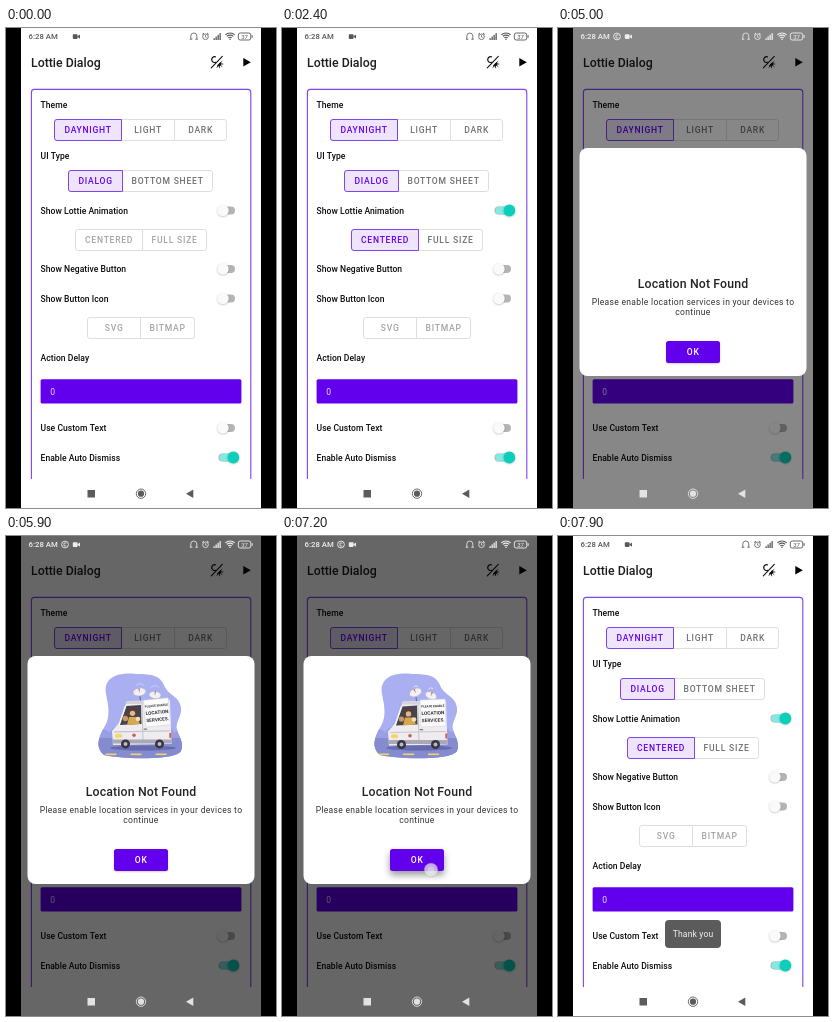
Recreate the animation shown at these times as an HTML page with a canvas. Size 270x480 px, loop 8000 ms.

```html
<!DOCTYPE html>
<html lang="en">
<head>
<meta charset="utf-8">
<title>Lottie Dialog</title>
<style>
html, body { margin: 0; width: 100%; height: 100%; overflow: hidden; background: #000; }
canvas { display: block; width: 270px; height: 480px; }
</style>
</head>
<body>
<canvas id="stage"></canvas>
<script>
const W = 270, H = 480, LOOP = 8000;
const PURPLE = '#6200ee', EDGE = '#7f45ee', RULE = '#dedede', TEAL = '#0cceba', INK = '#1c1c1c';
const canvas = document.getElementById('stage');
const ctx = canvas.getContext('2d');
const ratio = window.devicePixelRatio || 1;
canvas.width = W * ratio;
canvas.height = H * ratio;

const clamp = v => Math.max(0, Math.min(1, v));
const ease = v => v * v * (3 - 2 * v);
const ramp = (t, from, to) => ease(clamp((t - from) / (to - from)));
const mix = (a, b, k) => a + (b - a) * k;
const gray = v => `rgb(${Math.round(v)},${Math.round(v)},${Math.round(v)})`;

function text(str, x, y, o = {}) {
  ctx.font = `${o.weight || 400} ${o.size || 8.55}px Roboto, sans-serif`;
  ctx.letterSpacing = (o.spacing ?? 0.3) + 'px';
  ctx.textAlign = o.align || 'left';
  ctx.textBaseline = 'alphabetic';
  ctx.fillStyle = o.color || INK;
  ctx.fillText(str, x, y);
}

function paint(fill, stroke, width) {
  if (fill) { ctx.fillStyle = fill; ctx.fill(); }
  if (stroke) { ctx.strokeStyle = stroke; ctx.lineWidth = width; ctx.stroke(); }
}

function box(x, y, w, h, r, fill, stroke, width = 1) {
  ctx.beginPath();
  ctx.roundRect(x, y, w, h, r);
  paint(fill, stroke, width);
}

function disc(x, y, r, fill, stroke, width = 1) {
  ctx.beginPath();
  ctx.arc(x, y, r, 0, Math.PI * 2);
  paint(fill, stroke, width);
}

function poly(points, fill) {
  ctx.beginPath();
  points.forEach(([x, y]) => ctx.lineTo(x, y));
  ctx.closePath();
  paint(fill);
}

function line(points, color, width) {
  ctx.beginPath();
  points.forEach(([x, y]) => ctx.lineTo(x, y));
  paint(null, color, width);
}

function layer(alpha, draw) {
  if (alpha <= 0) return;
  ctx.save();
  ctx.globalAlpha *= alpha;
  draw();
  ctx.restore();
}

function shadow(color, blur, dy) {
  ctx.shadowColor = color;
  ctx.shadowBlur = blur * ratio;
  ctx.shadowOffsetY = dy * ratio;
}

// Segmented buttons: edges hold the borders from left to right.
function group(labels, edges, y, selected, enabled = 1) {
  const last = edges.length - 1;
  const left = edges[0] + 0.5, width = edges[last] - edges[0];
  box(left, y + 0.5, width, 21, 2.5, null, RULE);
  edges.slice(1, last).forEach(x => line([[x + 0.5, y + 1], [x + 0.5, y + 21]], RULE, 1));
  const tone = gray(mix(164, 112, enabled));
  labels.forEach((label, i) => {
    const mid = (edges[i] + edges[i + 1]) / 2 + 0.6;
    const style = { weight: 500, spacing: 0.76, align: 'center' };
    const on = i === selected ? enabled : 0;
    layer(on, () => box(edges[i] + 0.5, y + 0.5, edges[i + 1] - edges[i], 21,
      [i ? 0 : 2.5, 0, 0, i ? 0 : 2.5], '#eee5fd', EDGE));
    layer(1 - on, () => text(label, mid, y + 14, { ...style, color: tone }));
    layer(on, () => text(label, mid, y + 14, { ...style, color: PURPLE }));
  });
}

function toggle(y, on) {
  box(212.5, y - 4, 16.5, 8, 4, '#b4b4b4');
  layer(on, () => box(213.5, y - 4, 17, 8, 4, '#84e9df'));
  const x = mix(217, 227.3, on);
  ctx.save();
  shadow('rgba(0,0,0,0.25)', 2, 0.6);
  disc(x, y, mix(5.7, 6, on), '#fafafa');
  ctx.restore();
  layer(on, () => disc(x, y, 6, TEAL));
}

function label(str, y) {
  text(str, 34.5, y, { weight: 500, spacing: 0.05, color: '#0c0c0c' });
}

function themeIcon() {
  ctx.lineCap = 'round';
  ctx.beginPath();
  ctx.arc(208.6, 31.6, 2.9, 1.2, 5);
  paint(null, '#111', 1.2);
  line([[205.3, 39.8], [216.3, 28.4]], '#111', 1.1);
  for (let i = 0; i < 5; i++) {
    const a = -0.7 + i * 0.7;
    line([[213, 36], [213 + 3.9 * Math.cos(a), 36 + 3.9 * Math.sin(a)]], '#111', 0.8);
  }
  ctx.beginPath();
  ctx.arc(212.8, 35.8, 2.5, -0.8, 2.35);
  paint('#111');
  ctx.lineCap = 'butt';
}

function screen(t) {
  const on = ramp(t, 1850, 2050);
  ctx.fillStyle = '#fff';
  ctx.fillRect(15, 0, 240, H);
  text('Lottie Dialog', 25, 38.5, { size: 12.3, weight: 500, spacing: 0 });
  themeIcon();
  poly([[237.3, 30], [244.8, 34.2], [237.3, 38.4]], '#000');

  ctx.save();
  ctx.beginPath();
  ctx.rect(15, 50, 240, 401);
  ctx.clip();
  box(25.4, 61.4, 219.4, 420, 3, null, EDGE, 1.1);
  ctx.restore();

  label('Theme', 80);
  group(['DAYNIGHT', 'LIGHT', 'DARK'], [48, 115, 168, 220], 91, 0);
  label('UI Type', 131);
  group(['DIALOG', 'BOTTOM SHEET'], [62, 116, 206], 142, 0);
  label('Show Lottie Animation', 185.5);
  toggle(182.5, on);
  group(['CENTERED', 'FULL SIZE'], [69, 136, 200], 201, 0, on);
  label('Show Negative Button', 244);
  toggle(241, 0);
  label('Show Button Icon', 273.5);
  toggle(270.5, 0);
  group(['SVG', 'BITMAP'], [81, 134, 188], 289, -1, 0);
  label('Action Delay', 333);
  box(34.6, 351.3, 200.8, 24.2, 1.5, PURPLE);
  text('0', 44.3, 366.5, { color: '#eee2ff' });
  label('Use Custom Text', 403);
  toggle(400, 0);
  label('Enable Auto Dismiss', 432.5);
  toggle(429.5, 1);
}

function statusBar(dark) {
  const c = gray(mix(88, 238, dark));
  text('6:28 AM', 22.5, 11.2, { size: 7.8, weight: 500, spacing: 0, color: c });
  layer(dark, () => {
    disc(59, 8.5, 3.4, null, c, 0.9);
    line([[60.5, 7], [58, 7], [58, 10], [60.5, 10]], c, 0.8);
  });
  box(66.8, 6.3, 4.8, 4.6, 0.8, c);
  poly([[71.2, 8.6], [74, 6.5], [74, 10.7]], c);

  ctx.beginPath();
  ctx.arc(187.8, 8, 3, Math.PI, 0);
  ctx.lineTo(190.8, 11);
  ctx.moveTo(184.8, 8);
  ctx.lineTo(184.8, 11);
  paint(null, c, 0.8);
  line([[183.8, 11.2], [186.3, 11.2]], c, 0.9);
  line([[189.3, 11.2], [191.8, 11.2]], c, 0.9);

  disc(199.5, 8.8, 2.8, null, c, 0.8);
  line([[199.5, 7.2], [199.5, 9], [200.8, 9.5]], c, 0.7);
  line([[196.2, 6.5], [198, 5]], c, 0.9);
  line([[201, 5], [202.8, 6.5]], c, 0.9);

  ctx.fillStyle = c;
  for (let i = 0; i < 4; i++) ctx.fillRect(207.5 + i * 2, 10.2 - i * 1.7, 1.3, 1.8 + i * 1.7);

  for (const r of [2.4, 4.5, 6.6]) {
    ctx.beginPath();
    ctx.arc(224, 11.6, r, -Math.PI * 0.75, -Math.PI * 0.25);
    paint(null, c, 1.1);
  }
  disc(224, 11.3, 0.8, c);

  box(232.3, 5, 12.5, 7, 2, null, c, 0.9);
  ctx.fillStyle = c;
  ctx.fillRect(245.6, 7.2, 1, 2.6);
  text('37', 238.6, 10.7, { size: 6, spacing: 0, align: 'center', color: c });
}

function navBar(dark) {
  const c = gray(mix(92, 226, dark));
  ctx.fillStyle = c;
  ctx.fillRect(81.5, 462, 7.5, 7.5);
  disc(135, 465.7, 4.7, null, c, 0.9);
  disc(135, 465.7, 3.1, c);
  poly([[180, 465.7], [187.3, 461.4], [187.3, 470]], c);
}

function blobPath() {
  ctx.beginPath();
  ctx.moveTo(100, 158);
  ctx.bezierCurveTo(97, 141, 113, 136, 130, 138);
  ctx.bezierCurveTo(147, 138, 154, 140, 158, 149);
  ctx.bezierCurveTo(161, 159, 174, 160, 175, 172);
  ctx.bezierCurveTo(176, 181, 169, 185, 171, 194);
  ctx.bezierCurveTo(174, 202, 178, 208, 175, 215);
  ctx.bezierCurveTo(170, 225, 112, 223, 98, 219);
  ctx.bezierCurveTo(88, 211, 94, 198, 99, 190);
  ctx.bezierCurveTo(105, 179, 102, 169, 100, 158);
  ctx.closePath();
}

function dish(x, y, r, tilt) {
  line([[x, y], [x + 1, y + 9]], '#60647f', 1);
  ctx.save();
  ctx.translate(x, y);
  ctx.rotate(tilt);
  ctx.beginPath();
  ctx.ellipse(0, 0, r, r * 0.62, 0, 0, Math.PI * 2);
  paint('#f1f0f4', '#b3b4c8', 0.7);
  line([[0, 0], [0, -3]], '#777', 0.6);
  disc(0, -3, 0.8, '#dd5a4e');
  ctx.restore();
}

function van(t) {
  const sway = Math.sin(t / 150);
  dish(133.5, 156, 6.5, -0.3 + sway * 0.15);
  dish(149, 159, 6, 0.25 - sway * 0.15);
  // body and cab
  poly([[121, 165], [164, 164], [165.5, 208], [107, 209], [106, 195], [113, 187]], '#eeecef');
  poly([[121, 165], [139, 165], [139, 168], [120, 168]], '#d5d3dc');
  poly([[120.5, 170], [135, 169], [135.5, 188], [113.5, 189]], '#47434b');
  // driver and companion
  disc(126, 176, 3.6, '#5a4030');
  disc(126.5, 177.4, 2.7, '#e6b58d');
  poly([[121, 189], [123, 181], [131, 181], [134, 188]], '#d5a84c');
  disc(119.4, 182.6, 2.7, '#c89868');
  disc(132, 183, 2.3, '#f0ddbd');
  line([[119.5, 170], [113, 189.5]], '#f8f7fa', 1.4);
  line([[136, 168], [137, 207]], '#b8b6c3', 0.8);
  line([[108, 196], [164, 195]], '#c6c4d0', 1.2);
  box(106, 203.5, 59.5, 4, 1, '#a9a8b7');
  box(109, 197.8, 7, 4, 1.5, '#f6d667');
  disc(128, 199.3, 1.8, '#d05b50');
  box(137.6, 192.5, 3.6, 1.2, 0.5, '#777486');
  ctx.fillStyle = '#dc5a50';
  ctx.fillRect(163.3, 197, 2, 5);
  for (const x of [119.5, 153.5]) {
    disc(x, 208, 4.5, '#35343f');
    disc(x, 208, 2, '#b9b9c6');
  }
  // roof sign
  ctx.save();
  ctx.translate(151, 176.5);
  ctx.rotate(-0.06 - sway * 0.035);
  box(-12.5, -13.5, 25, 27, 0.5, '#fcfbfb', '#cfcdd8', 0.5);
  const sign = { weight: 700, spacing: 0, align: 'center', color: '#32303a' };
  text('PLEASE ENABLE', 0, -5.8, { ...sign, size: 3.1 });
  text('LOCATION', 0, 1.6, { ...sign, size: 4.8 });
  text('SERVICES.', 0, 8.8, { ...sign, size: 4.7 });
  ctx.restore();
}

function scene(t) {
  ctx.save();
  blobPath();
  ctx.clip();
  ctx.fillStyle = '#a9aff0';
  ctx.fillRect(90, 135, 90, 92);
  // distant hills and road
  for (let i = 0; i < 5; i++) disc(96 + i * 20, 203, 10 + (i % 2) * 4, '#999fe4');
  ctx.fillStyle = '#858bcf';
  ctx.fillRect(90, 202, 90, 24);
  ctx.fillStyle = '#f2d568';
  const shift = (t * 0.055) % 25;
  for (let x = 75; x < 200; x += 25) ctx.fillRect(x + shift, 217.5, 11, 1.6);
  ctx.beginPath();
  ctx.ellipse(137, 212, 33, 2.6, 0, 0, Math.PI * 2);
  paint('#666bad');
  ctx.restore();

  const wave = (t % 800) / 800;
  for (const [x, y] of [[134, 153], [149, 155]]) {
    layer((1 - wave) * 0.8, () => {
      ctx.beginPath();
      ctx.arc(x, y, 3 + wave * 6, -2.5, -0.7);
      paint(null, '#fff', 0.8);
    });
  }
  ctx.save();
  ctx.translate(0, Math.sin(t / 75) * 0.5);
  van(t);
  ctx.restore();
}

function dialog(t) {
  box(21.5, 120, 227, 228, 8, '#fff');
  layer(ramp(t, 5450, 5700), () => scene(t));
  text('Location Not Found', 135, 259.5, { size: 12.3, weight: 500, spacing: 0.14, align: 'center', color: '#242424' });
  const body = { align: 'center', color: '#333' };
  text('Please enable location services in your devices to', 135, 277, body);
  text('continue', 135, 287, body);
  const press = ramp(t, 7050, 7200);
  ctx.save();
  shadow(`rgba(0,0,0,${mix(0.22, 0.4, press)})`, mix(2, 7, press), mix(0.8, 4, press));
  box(108, 313, 54, 22, 2.5, PURPLE);
  ctx.restore();
  text('OK', 135.2, 327.2, { weight: 500, spacing: 0.76, align: 'center', color: '#fff' });
}

function touch(t, x, y, from, to) {
  const k = ramp(t, from - 60, from) * (1 - ramp(t, to, to + 120));
  layer(k, () => {
    disc(x, y, 6.8, 'rgba(236,236,236,0.72)', 'rgba(165,165,165,0.5)', 0.8);
    disc(x, y, 3.2, 'rgba(255,255,255,0.3)');
  });
}

function toast() {
  box(107, 384, 56, 28, 4, '#5b5b5b');
  text('Thank you', 135, 401.3, { align: 'center', spacing: 0.15, color: '#f1f1f1' });
}

function render(t) {
  ctx.setTransform(ratio, 0, 0, ratio, 0, 0);
  ctx.fillStyle = '#000';
  ctx.fillRect(0, 0, W, H);
  screen(t);

  const ripple = ramp(t, 1750, 1850) * (1 - ramp(t, 1950, 2200));
  layer(ripple * 0.14, () => disc(mix(217, 227.3, ramp(t, 1850, 2050)), 182.5, 12, '#444'));
  touch(t, 222, 183, 1750, 1900);
  touch(t, 244.3, 34, 4400, 4560);

  const leave = 1 - ramp(t, 7340, 7580);
  const shown = ramp(t, 4700, 4960) * leave;
  const dim = ramp(t, 4650, 5150) * leave;
  layer(dim * 0.6, () => {
    ctx.fillStyle = '#000';
    ctx.fillRect(15, 0, 240, H);
  });
  statusBar(shown);
  navBar(shown);
  layer(shown, () => {
    const s = mix(0.92, 1, shown);
    ctx.translate(135, 234);
    ctx.scale(s, s);
    ctx.translate(-135, -234);
    dialog(t);
  });
  touch(t, 149, 334, 7150, 7260);
  layer(ramp(t, 7450, 7700), toast);
}

const start = performance.now();
function tick() {
  render((performance.now() - start) % LOOP);
  requestAnimationFrame(tick);
}
tick();
</script>
</body>
</html>
```
